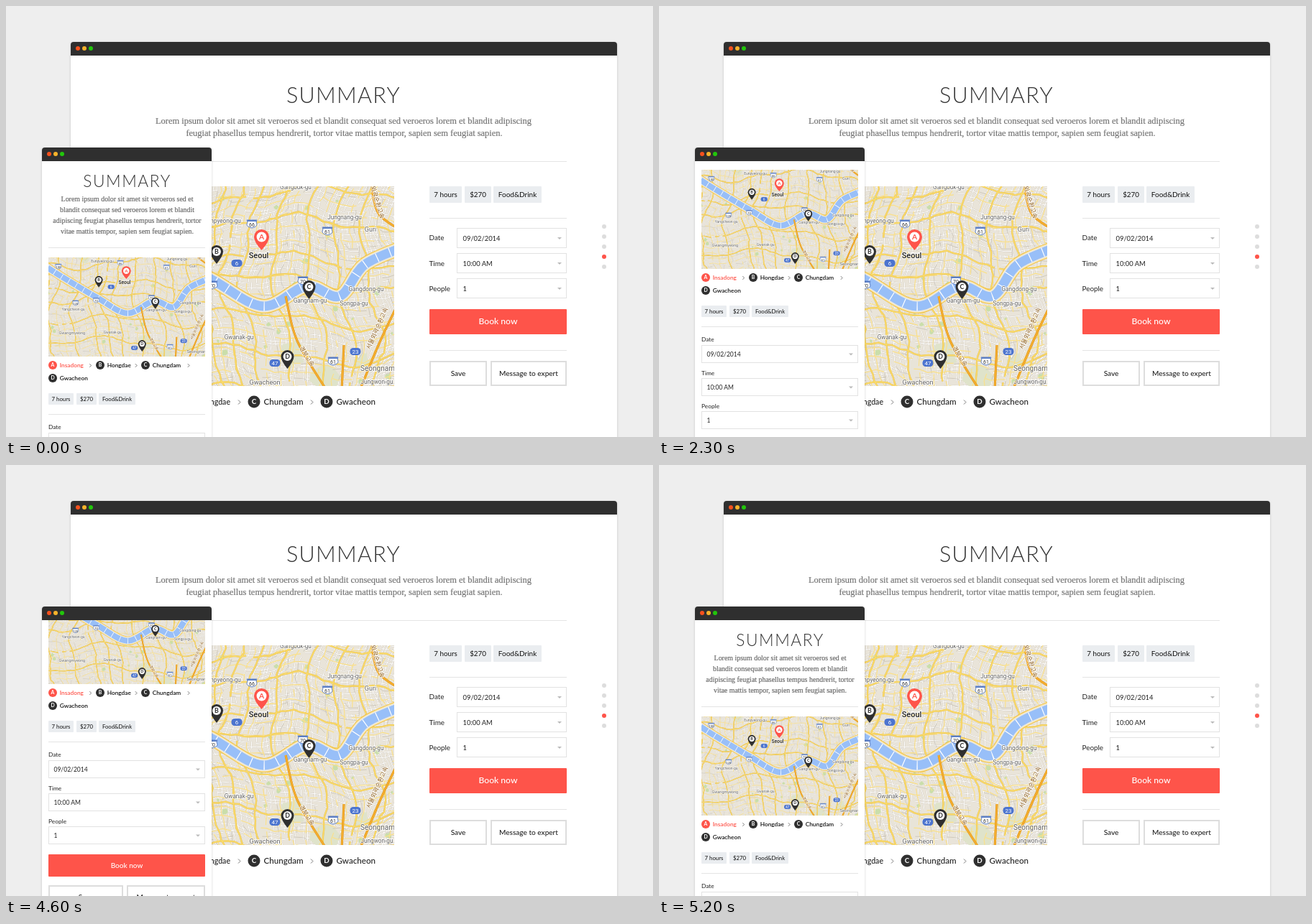
An HTML page that plays this animation: 900x600 px, repeating every 5.3 s.

```html
<!DOCTYPE html>
<html lang="en">
<head>
<meta charset="utf-8">
<title>Summary</title>
<style>
html, body { margin: 0; width: 100%; height: 100%; overflow: hidden; background: #eee; }
svg { display: block; font-family: Lato, sans-serif; }
.serif { font-family: "Liberation Serif", serif; fill: #747474; stroke: #747474; stroke-width: .2px; }
.map { font-family: Roboto, "Noto Sans CJK KR", "Noto Sans CJK", sans-serif; }
</style>
</head>
<body>
<svg id="stage" width="900" height="600" viewBox="0 0 900 600"></svg>
<script>
const RED = '#fe544a', DARK = '#2f2f2f';
const ROWS = [['Date', '09/02/2014'], ['Time', '10:00 AM'], ['People', '1']];

// Seeded random numbers
let seed = 11;
const rnd = () => (seed = (seed * 16807) % 2147483647) / 2147483647;
const range = (a, b) => a + rnd() * (b - a);
const repeat = (n, f) => Array.from({length: n}, (_, i) => f(i)).join('');

// Shape helpers, each returning SVG markup
const rect = (x, y, w, h, fill, extra = '') =>
  `<rect x="${x}" y="${y}" width="${w}" height="${h}" fill="${fill}" ${extra}/>`;
const dot = (x, y, r, fill) => `<circle cx="${x}" cy="${y}" r="${r}" fill="${fill}"/>`;
const path = (d, stroke, width, extra = '') =>
  `<path d="${d}" fill="none" stroke="${stroke}" stroke-width="${width}" stroke-linejoin="round" ${extra}/>`;
const text = (x, y, size, str, extra = '') =>
  `<text x="${x}" y="${y}" font-size="${size}" ${extra}>${str.replace('&', '&amp;')}</text>`;
const mid = (x, y, size, str, extra = '') => text(x, y, size, str, 'text-anchor="middle" ' + extra);
const rule = (x1, x2, y) => rect(x1, y, x2 - x1, 1, '#e4e4e4');

// Smooth curve passing through every point
function curve(pts) {
  const at = i => pts[Math.max(0, Math.min(pts.length - 1, i))];
  const lean = (i, k) => at(i).map((v, c) => v + k * (at(i + 1)[c] - at(i - 1)[c]) / 6);
  return 'M' + pts[0] + pts.slice(1).map((p, i) => `C${lean(i, 1)} ${lean(i + 1, -1)} ${p}`).join('');
}

// Bent street grid: both directions, uneven spacing, a share of the blocks left out
function streets(step, missing, jitter) {
  const bend = (x, y) => [
    x + 14 * Math.sin(y / 47 + x / 120) + 5 * Math.sin(y / 17),
    y + 12 * Math.sin(x / 53 + y / 90) + 5 * Math.cos(x / 19)
  ].map(v => (v + range(-jitter, jitter)).toFixed(1));
  let d = '';
  for (const across of [true, false])
    for (let a = 140; a < 580; a += step * range(0.6, 1.4)) {
      let pen = 'M';
      for (let b = 140; b < 580; b += 9) {
        d += pen + (across ? bend(b, a) : bend(a, b));
        pen = rnd() < missing ? 'M' : 'L';
      }
    }
  return d;
}

function patch(x, y, r, fill) {
  const pts = repeat(11, i => {
    const a = i * Math.PI * 2 / 11, d = r * range(0.6, 1.15);
    return `${(x + d * Math.cos(a)).toFixed(1)},${(y + d * Math.sin(a)).toFixed(1)} `;
  });
  return `<polygon points="${pts}" fill="${fill}"/>`;
}

const label = (x, y, str, size = 8.2, extra = '') =>
  mid(x, y, size, str, `fill="#666" stroke="#fff" stroke-width="1.8" paint-order="stroke" stroke-opacity=".8" ${extra}`);
const roadName = (x, y, angle, str) =>
  label(0, 0, str, 8.5, `transform="translate(${x} ${y}) rotate(${angle})" style="fill:#8a5a18"`);
const blueSign = (x, y, n) =>
  rect(x - 7.5, y - 5, 15, 10, '#4c74cf', 'rx="4.5"') + mid(x, y + 3, 8, n, 'fill="#fff"');
const shield = (x, y, n) =>
  `<path d="M${x - 7} ${y - 5}h14l-1 3q3 5 -3 7l-3 1-3-1q-6-2 -3-7z" fill="#fff" stroke="#5c7fc6"/>` +
  rect(x - 6, y - 5, 12, 2, '#5c7fc6') + mid(x, y + 4, 7, n, 'fill="#333"');

function pin(x, y, r, letter, fill) {
  const tip = r + 8, low = r * 0.65;
  return `<path d="M${x - r} ${y}a${r} ${r} 0 0 1 ${2 * r} 0q0 ${low} ${-r} ${tip}q${-r} ${low - tip} ${-r} ${-tip}z" fill="${fill}"/>` +
    dot(x, y, r * 0.66, '#fff') +
    mid(x, y + r * 0.35, r * 0.98, letter, `fill="${fill}" font-weight="700" font-family="Lato, sans-serif"`);
}

function cityMap() {
  const river = curve([[160, 303], [209, 335], [290, 383], [358, 418], [418, 390], [464, 404], [499, 360], [560, 333]]);
  const highways = curve([[389, 404], [405, 466], [446, 535]]) + curve([[508, 245], [519, 290], [560, 318]]) +
    curve([[545, 415], [519, 470], [492, 535]]) + curve([[470, 472], [467, 535]]);
  const alleys = streets(7, 0.3, 1.2), avenues = streets(40, 0.04, 1.5);
  // Wooded hills lie north and south of the centre
  const hills = repeat(13, i => patch(range(170, 550), i % 2 ? range(250, 290) : range(455, 525), range(11, 24), i % 3 ? '#e8e4d8' : '#dfe3ca'));
  const parks = repeat(35, () => patch(range(165, 545), range(255, 525), range(2, 5), '#cadeaa'));

  return rect(150, 240, 420, 300, '#e9e4d9') +
    path(alleys, '#cfc8bb', 1.7) + path(alleys, '#fff', 1) + hills + parks +
    path(streets(30, 0.55, 3), '#bdb6a8', 0.6) + path(streets(19, 0.3, 2), '#fae08a', 1.2) +
    path(avenues, '#e3b94e', 2.3) + path(avenues, '#fbdc69', 1.6) +
    path(river, '#efbc3f', 20) + path(river, '#fbe18b', 18.5) + path(river, '#eee9dc', 16.5) +
    path(river, '#98bff8', 13) + path(river, '#fff', 13, 'stroke-dasharray="1.2 18"') +
    path(highways, '#d7921d', 3.2) + path(highways, '#f5ad2e', 2.3) +
    shield(342, 303, '66') + shield(447, 313, '61') + shield(455, 494, '61') + shield(413, 382, '70') +
    shield(287, 388, '70') + shield(201, 311, '100') + shield(240, 394, '120') +
    blueSign(321, 358, '6') + blueSign(374, 497, '47') + blueSign(486, 481, '23') +
    label(403, 255, 'Gangbuk-gu') + label(301, 302, 'Eunpyeong-gu') + label(471, 297, 'Jungnang-gu') +
    label(507, 314, 'Guri', 9) + label(501, 397, 'Gangdong-gu') + label(484, 417, 'Songpa-gu') +
    label(423, 413, 'Gangnam-gu') + label(324, 464, 'Gwanak-gu') + label(360, 527, 'Gwacheon', 9.2) +
    label(517, 508, 'Seongnam', 10) + label(516, 526, 'Jungwon-gu') +
    label(235, 412, 'Yangcheon-gu') + label(232, 466, 'Gwangmyeong', 9) +
    label(351.5, 351, 'Seoul', 11, 'font-weight="500" style="fill:#222"') +
    roadName(416, 489, 58, '경부고속') + roadName(514, 274, 73, '외곽순환고속') + roadName(519, 450, -66, '서울외곽순환고속') +
    pin(355.5, 321.5, 10.5, 'A', RED) + pin(293, 342, 9, 'B', DARK) +
    pin(421.5, 391, 9, 'C', DARK) + pin(391.5, 488, 9, 'D', DARK);
}

const frame = (x, y, w, h) =>
  rect(x, y, w, h, '#fff', 'rx="4" filter="url(#shadow)"') +
  `<path d="M${x} ${y + 19}v-15q0-4 4-4h${w - 8}q4 0 4 4v15z" fill="${DARK}"/>` +
  ['#f6511d', '#f7b32b', '#22c60b'].map((c, i) => dot(x + 10 + 9 * i, y + 9, 3, c)).join('');
const title = (x, y, size, gap) =>
  mid(x, y, size, 'SUMMARY', `font-weight="300" letter-spacing="${gap}" fill="#333"`);
const chip = (x, y, w, h, size, str) =>
  rect(x, y, w, h, '#eaedf0', 'rx="1"') + mid(x + w / 2, y + h / 2 + size * 0.36, size, str, 'fill="#111"');
const field = (x, y, w, h, size, str, pad) =>
  rect(x + 0.5, y + 0.5, w - 1, h - 1, '#fff', 'stroke="#e2e2e2"') +
  text(x + pad, y + h / 2 + size * 0.38, size, str, 'fill="#222"') +
  `<path d="M${x + w - 13} ${y + h / 2 - 1}h6l-3 3z" fill="#bbb"/>`;
const button = (x, y, w, h, str) =>
  rect(x + 1, y + 1, w - 2, h - 2, '#fff', 'stroke="#ddd" stroke-width="2"') +
  mid(x + w / 2, y + h / 2 + 3.5, 10.1, str, 'fill="#111"');
const booking = (x, y, w, h, size) =>
  rect(x, y, w, h, RED, 'rx="1"') + mid(x + w / 2, y + h / 2 + size * 0.33, size, 'Book now', 'fill="#fff" font-weight="500"');
const badge = (x, y, r, letter, fill) =>
  dot(x, y, r, fill) + mid(x, y + r * 0.4, r * 1.15, letter, 'fill="#fff" font-weight="700"');
const chevron = (x, y, s) => path(`M${x - s / 2} ${y - s}l${s} ${s}l${-s} ${s}`, '#777', 1);

function desktop() {
  const stop = (x, letter, name) => chevron(x - 20.5, 551.5, 3) + badge(x, 551, 8.5, letter, DARK) +
    text(x + 13.5, 555, 11.6, name, 'fill="#222" font-weight="500"');
  return frame(90, 50, 760, 560) + title(469.5, 135, 30.5, 1.3) +
    mid(469.5, 164, 12.44, 'Lorem ipsum dolor sit amet sit veroeros sed et blandit consequat sed veroeros lorem et blandit adipiscing', 'class="serif"') +
    mid(470.5, 181, 12.44, 'feugiat phasellus tempus hendrerit, tortor vitae mattis tempor, sapien sem feugiat sapien.', 'class="serif"') +
    rule(160, 780, 216) +
    '<g clip-path="url(#wide)"><use href="#map"/></g>' +
    text(312, 555, 10.6, 'Hongdae', 'text-anchor="end" fill="#222" font-weight="500"') +
    stop(345, 'C', 'Chungdam') + stop(446, 'D', 'Gwacheon') +
    chip(589, 251, 45, 23, 9.8, '7 hours') + chip(638, 251, 37, 23, 9.8, '$270') + chip(678, 251, 67, 23, 10, 'Food&Drink') +
    rule(589, 780, 295) +
    ROWS.map(([name, value], i) => text(588.5, 326 + 35.5 * i, 9.9, name, 'fill="#222"') +
      field(627, 309 + 35 * i, 153, 28, 9.4, value, 8.5)).join('') +
    booking(589, 422, 191, 35, 12.1) + rule(589, 780, 479) +
    button(589, 494, 80, 35, 'Save') + button(674, 494, 106, 35, 'Message to expert') +
    repeat(5, i => dot(832, 307 + 14 * i, 3, i == 3 ? RED : '#ddd'));
}

function phone() {
  const lines = ['Lorem ipsum dolor sit amet sit veroeros sed et', 'blandit consequat sed veroeros lorem et blandit',
    'adipiscing feugiat phasellus tempus hendrerit, tortor', 'vitae mattis tempor, sapien sem feugiat sapien.'];
  const stop = (x, y, letter, name, fill, ink) => badge(x, y, 6, letter, fill) +
    text(x + 9.7, y + 3, 8.3, name, `fill="${ink}" font-weight="600"`);
  return frame(50, 197, 236, 410) + '<g clip-path="url(#view)"><g id="page">' +
    title(168.5, 252, 22.7, 1.6) +
    lines.map((l, i) => mid(168.5, 272 + 15 * i, 9.92, l, 'class="serif" style="fill:#626262"')).join('') +
    rule(59, 277, 336) +
    '<g clip-path="url(#small)"><use href="#map" transform="translate(-50.1 172.1) scale(.6116)"/></g>' +
    stop(65, 500, 'A', 'Insadong', RED, RED) + stop(131, 500, 'B', 'Hongdae', DARK, '#111') +
    stop(194, 500, 'C', 'Chungdam', DARK, '#111') + stop(65, 518, 'D', 'Gwacheon', DARK, '#111') +
    [117.5, 181, 254].map(x => chevron(x, 500.5, 2.3)).join('') +
    chip(59, 539, 35, 16, 7.8, '7 hours') + chip(98, 539, 28, 16, 7.8, '$270') + chip(129, 539, 51, 16, 7.7, 'Food&Drink') +
    rule(59, 277, 568) +
    ROWS.map(([name, value], i) => text(59, 589 + 46.5 * i, 8.4, name, 'fill="#222"') +
      field(59, 594 + 46 * i, 218, 25, 8.5, value, 7.5)).join('') +
    booking(59, 725, 218, 31, 10) +
    button(59, 768, 104, 32, 'Save') + button(168, 768, 109, 32, 'Message to expert') + '</g></g>';
}

const clip = (id, x, y, w, h) => `<clipPath id="${id}">${rect(x, y, w, h, '#000')}</clipPath>`;

document.getElementById('stage').innerHTML =
  `<defs><filter id="shadow" x="-5%" y="-5%" width="110%" height="110%">
    <feDropShadow dx="0" dy="1" stdDeviation="1.5" flood-opacity=".18"/></filter>
  ${clip('wide', 160, 251, 380, 278)}${clip('small', 59, 350, 218, 138)}${clip('view', 50, 216, 236, 384)}
  <g id="map" class="map">${cityMap()}</g></defs>` +
  rect(0, 0, 900, 600, '#eee') + desktop() + phone();

// The page scrolls down in seven equal steps, rests, and scrolls back
const page = document.getElementById('page'), start = performance.now();
function tick() {
  const n = Math.floor((performance.now() - start) % 5300 / 100);
  const step = Math.max(0, Math.min(7, n - 19, 52 - n));
  page.setAttribute('transform', `translate(0 ${-Math.round(step * 214 / 7)})`);
  requestAnimationFrame(tick);
}
tick();
</script>
</body>
</html>
```
